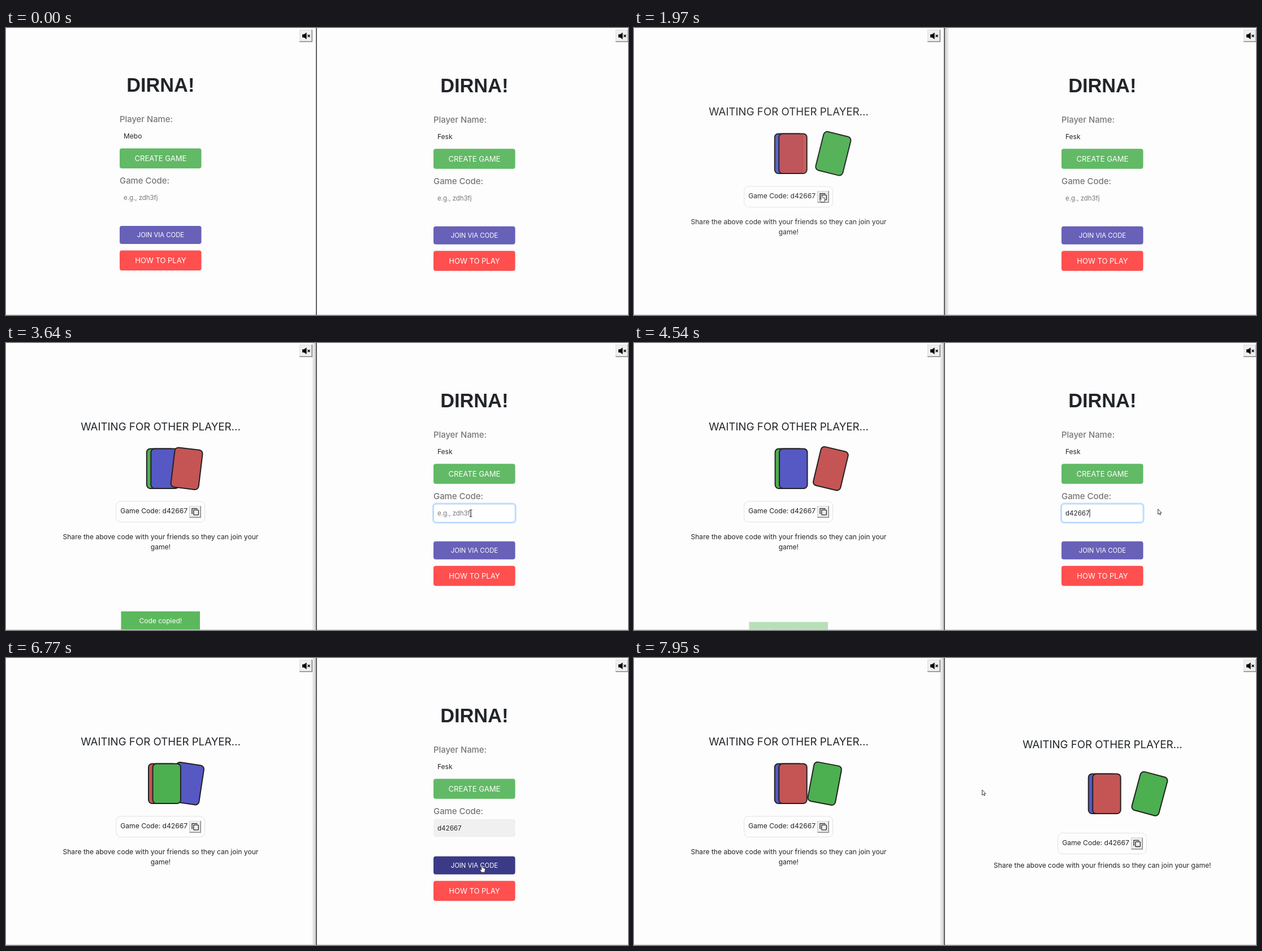
Recreate the animation shown at these times as an HTML page with a canvas. Size 1100 px wide and 509 px high, loop 8000 ms.

```html
<!DOCTYPE html>
<html lang="en">
<head>
<meta charset="utf-8">
<title>Card game lobby</title>
<style>
  html, body { margin: 0; width: 100%; height: 100%; overflow: hidden; background: #fdfdfd; }
  canvas { display: block; }
</style>
</head>
<body>
<canvas id="stage" width="1100" height="509"></canvas>
<script>
const ctx = document.getElementById('stage').getContext('2d');
const LOOP = 8000, BG = '#fdfdfd', INK = '#212529';
const RIGHT = 555;
const GREEN = '#4caf50', RED = '#c45554', BLUE = '#5658c4';
const CREATED = 1290, COPIED = 2450, FOCUSED = 3250, PASTED = 3900, BLURRED = 4900, JOINED = 6910;
const CARD_PERIOD = 2080, CARD_BACK = 1062;

// Pointer path: time, x, y of the tip
const PATH = [
  [320, 1042, 490], [650, 520, 380], [950, 270, 228], [1350, 266, 226], [1700, 300, 270],
  [1950, 332, 296], [2450, 334, 298], [2660, 581, 298], [2730, 672, 299], [3000, 760, 302],
  [3250, 822, 302], [3750, 822, 302], [4100, 900, 296], [4400, 905, 294], [4540, 926, 294],
  [4700, 946, 297], [5000, 946, 297], [5300, 889, 330], [5600, 845, 352], [5940, 842, 357],
  [6500, 842, 366], [6850, 842, 368], [7100, 842, 368], [7500, 640, 250], [7750, 616, 235],
  [8000, 615, 233]
];

const clamp = v => Math.max(0, Math.min(1, v));
const mix = (a, b, p) => a + (b - a) * p;
const smooth = v => { v = clamp(v); return v * v * (3 - 2 * v); };

// cubic-bezier(.25, .1, .25, 1)
function ease(v) {
  v = clamp(v);
  const bez = (s, a, b) => 3 * s * (1 - s) ** 2 * a + 3 * s * s * (1 - s) * b + s ** 3;
  let lo = 0, hi = 1;
  for (let i = 0; i < 20; i++) {
    const mid = (lo + hi) / 2;
    if (bez(mid, .25, .25) < v) lo = mid; else hi = mid;
  }
  return bez(lo, .1, 1);
}

function pointerAt(t) {
  if (t < PATH[0][0]) return null;
  const i = Math.max(1, PATH.findIndex(k => k[0] >= t));
  const [t0, x0, y0] = PATH[i - 1], [t1, x1, y1] = PATH[i];
  const p = (t - t0) / (t1 - t0);
  return { x: mix(x0, x1, p), y: mix(y0, y1, p) };
}

const inside = (m, x, y, w, h) => m && m.x >= x && m.x <= x + w && m.y >= y && m.y <= y + h;

function text(str, x, y, size, color = INK, align = 'left', weight = 400, family = 'Inter') {
  ctx.font = `${weight} ${size}px ${family}, sans-serif`;
  ctx.fillStyle = color;
  ctx.textAlign = align;
  ctx.fillText(str, x, y);
}

function box(x, y, w, h, r, fill, stroke, line = 1) {
  ctx.beginPath();
  ctx.roundRect(x, y, w, h, r);
  if (fill) { ctx.fillStyle = fill; ctx.fill(); }
  if (stroke) { ctx.strokeStyle = stroke; ctx.lineWidth = line; ctx.stroke(); }
}

function poly(points, fill, stroke, line = 1) {
  ctx.beginPath();
  points.forEach(([x, y]) => ctx.lineTo(x, y));
  ctx.closePath();
  if (fill) { ctx.fillStyle = fill; ctx.fill(); }
  if (stroke) { ctx.strokeStyle = stroke; ctx.lineWidth = line; ctx.lineJoin = 'round'; ctx.stroke(); }
}

function bevel(x, y, w, h) {
  box(x, y, w, h, 0, '#8a8a8a');
  box(x, y, w - 1.5, h - 1.5, 0, '#dcdcdc');
  box(x + 1, y + 1, w - 3, h - 3, 0, '#efefef');
}

function muteButton(x) {
  bevel(x, 3, 23, 22);
  poly([[x + 5, 11.3], [x + 8, 11.3], [x + 12.5, 8], [x + 12.5, 20], [x + 8, 16.7], [x + 5, 16.7]], '#000');
  ctx.strokeStyle = '#000';
  ctx.lineWidth = 1.4;
  ctx.beginPath();
  ctx.moveTo(x + 14.5, 12); ctx.lineTo(x + 18.5, 16);
  ctx.moveTo(x + 18.5, 12); ctx.lineTo(x + 14.5, 16);
  ctx.stroke();
}

function button(label, y, h, size, color, hoverColor, mouse) {
  const hover = inside(mouse, 201, y, 144.5, h);
  box(201, y, 144.5, h, 4, hover ? hoverColor : color);
  text(label, 273.4, y + h / 2 + size * .365, size, '#fff', 'center');
  return hover;
}

function codeField(t) {
  const focus = t >= FOCUSED && t < BLURRED, filled = t >= PASTED;
  if (focus) box(200.5, 284.3, 145.5, 33.5, 5, '#fff', '#bfdcff', 3);
  else if (filled) box(201, 285, 144.5, 31.5, 4, '#f0f0f0');
  if (filled) text('d42667', 208, 305, 11.6);
  else text('e.g., zdh3fj', 208, 305, 11.4, '#777');
  const caretOn = Math.floor((t - PASTED + 1800) / 500) % 2 === 0;
  if (focus && caretOn) box(filled ? 250.5 : 208, 293.5, 1, 15, 0, '#222');
}

// Returns the pointer shape wanted at the mouse position
function home(dx, dy, player, t, mouse) {
  const m = mouse && { x: mouse.x - dx, y: mouse.y - dy };
  ctx.save();
  ctx.translate(dx, dy);
  text('DIRNA!', 273.3, 113, 34.3, INK, 'center', 700, '"Liberation Sans"');
  text('Player Name:', 201, 167, 14.8, '#777', 'left', 500);
  text(player, 208, 196, 12);
  text('Game Code:', 201, 276, 14.9, '#777', 'left', 500);
  codeField(t);
  const over = [
    button('CREATE GAME', 213.5, 35.5, 13.1, '#62b966', '#3f8f43', m),
    button('JOIN VIA CODE', 351, 32, 11.3, '#6861b8', '#3a3a87', m),
    button('HOW TO PLAY', 394.5, 35.5, 13, '#ff4f4f', '#c93535', m)
  ].some(Boolean);
  ctx.restore();
  return over ? 'hand' : inside(m, 201, 285, 144.5, 31) ? 'beam' : 'arrow';
}

function card(x, y, color, angle = 0) {
  ctx.save();
  ctx.translate(x, y);
  ctx.rotate(angle * Math.PI / 180);
  box(-24.7, -35.3, 49.4, 70.6, 6.5, color, '#222', 2);
  ctx.restore();
}

function deck(cx, cy, age) {
  const colors = [GREEN, RED, BLUE];
  const turn = Math.floor(age / CARD_PERIOD), phase = age % CARD_PERIOD;
  const [moving, front, back] = [0, 1, 2].map(i => colors[(turn + i) % 3]);
  const returning = phase >= CARD_BACK;
  const out = ease(phase / 1000), home = ease((phase - CARD_BACK) / 1000);
  const x = returning ? mix(83.5, 0, home) : mix(15, 83.5, out);
  const angle = 15 * (returning ? 1 - home : out);
  const swing = () => card(cx + x, cy, moving, angle);
  if (returning) swing();
  card(cx + 7.5 * home, cy, back);
  card(cx + 7.5 + 7.5 * home, cy, front);
  if (!returning) swing();
}

function waiting(cx, shift, lines, age) {
  const [headY, deckY, codeY, shareY] = shift;
  ctx.save();
  ctx.globalAlpha = smooth(age / 800);
  text('WAITING FOR OTHER PLAYER...', cx, 154.5 + headY, 18.7, INK, 'center');
  deck(cx, 222.7 + deckY, age);
  ctx.translate(cx - 273.5, codeY);
  box(194.7, 280.8, 157, 36.8, 8, null, '#e2e2e2');
  text('Game Code: d42667', 202.3, 302, 12.1);
  bevel(324.5, 289, 20.5, 21);
  box(331.8, 296.2, 8.6, 8.6, 1, null, INK, 1.3);
  ctx.beginPath();
  ctx.moveTo(330, 302.3); ctx.lineTo(329, 302.3); ctx.lineTo(329, 293.7);
  ctx.lineTo(337.6, 293.7); ctx.lineTo(337.6, 294.8);
  ctx.stroke();
  ctx.translate(0, shareY - codeY);
  lines.forEach((line, i) => text(line, 273.4, 348 + 17.7 * i, 12.07, INK, 'center'));
  ctx.restore();
}

function toast(t) {
  const p = smooth((t - COPIED) / 420) - smooth((t - 4300) / 440);
  if (p <= 0) return;
  ctx.save();
  ctx.globalAlpha = p;
  const y = 509 - 33 * p;
  box(203.5, y, 139.5, 33, 0, '#5cb85c');
  text('Code copied!', 273.4, y + 21, 12, '#fff', 'center');
  ctx.restore();
}

function edge(from, to, strength) {
  const g = ctx.createLinearGradient(from, 0, to, 0);
  g.addColorStop(0, `rgba(0,0,0,${strength})`);
  g.addColorStop(1, 'rgba(0,0,0,0)');
  ctx.fillStyle = g;
  ctx.fillRect(Math.min(from, to), 0, Math.abs(to - from), 508);
}

function windowFrame(t) {
  muteButton(519);
  muteButton(1078);
  if (t >= 1150 && t < FOCUSED) edge(550, 558, .2);
  if (t >= FOCUSED) edge(548, 540, .2);
  ctx.fillStyle = '#d2d2d2';
  ctx.fillRect(0, 508, 1100, 1);
  ctx.fillStyle = '#4c4c4c';
  ctx.fillRect(548, 0, 1.8, 509);
}

function pointer({ x, y }, shape) {
  ctx.save();
  ctx.translate(x, y);
  if (shape === 'arrow') {
    poly([[.5, .5], [.5, 9.8], [2.6, 7.9], [4.1, 11], [5.5, 10.3], [4.1, 7.3], [6.8, 7.2]], '#fff', '#222', .9);
  } else if (shape === 'hand') {
    poly([[-1.2, 0], [.8, 0], [1.2, 4.6], [5, 5.6], [5.6, 7], [4.6, 12.6], [-1, 12.6], [-4, 8.4], [-3.4, 7.2], [-1.2, 8.4]],
      '#fff', '#222', .8);
  } else {
    box(-.5, -6, 1, 12, 0, '#333');
    box(-2.5, -6.5, 5, 1, 0, '#333');
    box(-2.5, 5.5, 5, 1, 0, '#333');
  }
  ctx.restore();
}

function draw(t) {
  const mouse = pointerAt(t);
  const shapes = [];
  ctx.fillStyle = BG;
  ctx.fillRect(0, 0, 1100, 509);

  if (t < CREATED) shapes.push(home(0, 0, 'Mebo', 0, mouse));
  else waiting(273.5, [0, 0, 0, 0],
    ['Share the above code with your friends so they can join your', 'game!'], t - CREATED);
  toast(t);

  if (t < JOINED) shapes.push(home(RIGHT, .7, 'Fesk', t, mouse));
  else waiting(828.4, [5.7, 18, 29.7, 24],
    ['Share the above code with your friends so they can join your game!'], t - JOINED);

  windowFrame(t);
  if (mouse) {
    const onCopy = t > CREATED && inside(mouse, 324, 289, 21, 21);
    pointer(mouse, onCopy ? 'hand' : shapes.find(s => s !== 'arrow') || 'arrow');
  }
}

function tick() {
  draw(performance.now() % LOOP);
  requestAnimationFrame(tick);
}
tick();
</script>
</body>
</html>
```
